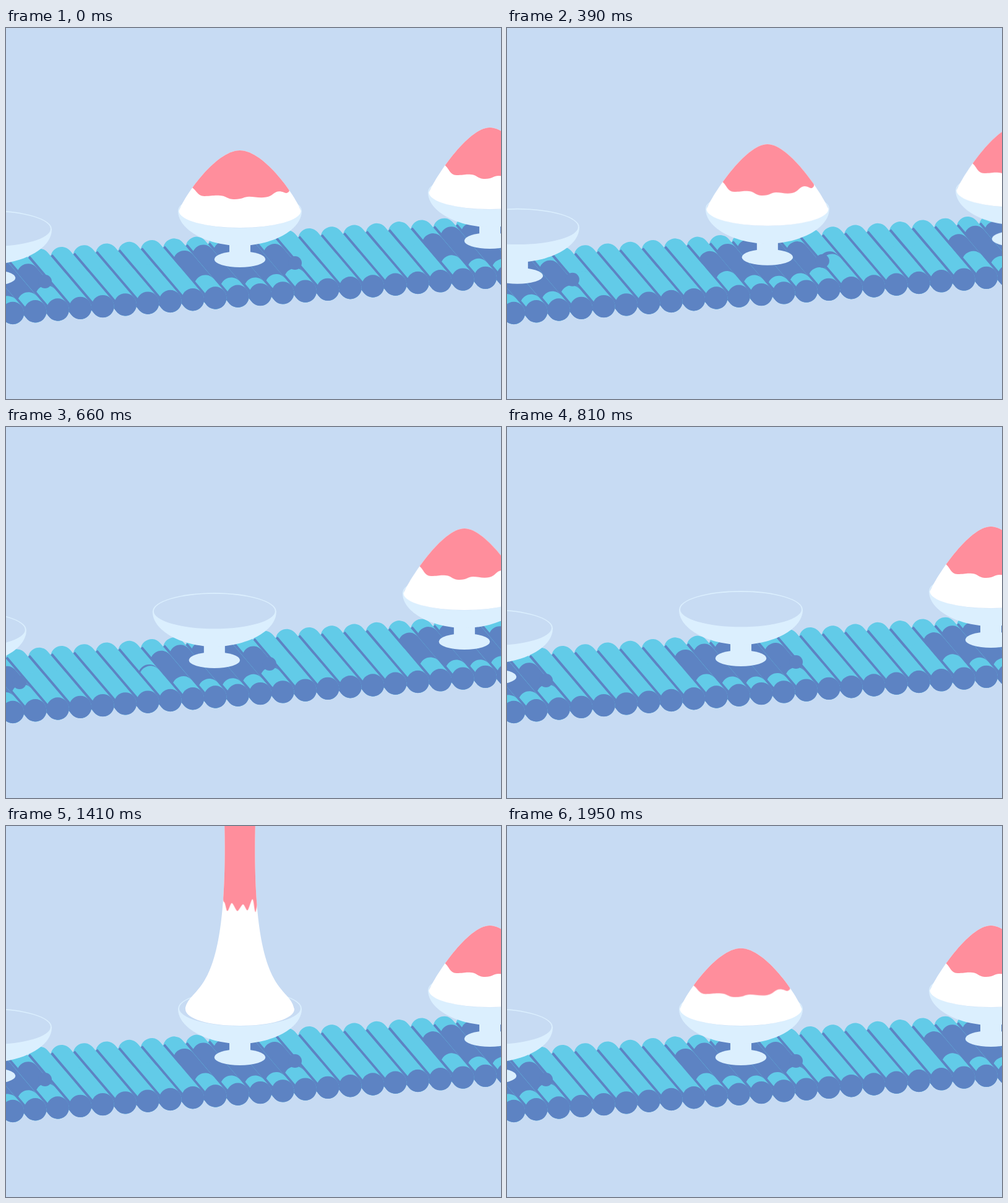
Animation of 800x600 px, one loop 1.98 s. Source, as an HTML page without scripts:

```html
<!DOCTYPE html>
<html lang="en">
<head>
<meta charset="utf-8">
<title>Shaved ice conveyor</title>
<style>
  @property --d { syntax: "<number>"; inherits: true; initial-value: 0; }

  :root {
    --sky: #c7dbf3;
    --cyan: #62cbe8;
    --navy: #5d83c3;
    --glass: #dbeffe;
    --pink: #ff8e9c;
    --time: 1980ms;

    --rest: path("M0 -103C-36 -103 -90 -20 -98.5 2C-98.5 17 -54 29 0 29C54 29 98.5 17 98.5 2C90 -20 36 -103 0 -103Z");
    --squash: path("M0 -96C-40 -96 -92 -19 -98.5 2C-98.5 17 -54 29 0 29C54 29 98.5 17 98.5 2C92 -19 40 -96 0 -96Z");
    --flat: path("M0 -80C-48 -80 -95 -16 -98.5 2C-98.5 17 -54 29 0 29C54 29 98.5 17 98.5 2C95 -16 48 -80 0 -80Z");
    --tall: path("M0 -141C-28 -141 -82 -36 -95 2C-95 17 -52 29 0 29C52 29 95 17 95 2C82 -36 28 -141 0 -141Z");
    --drip: path("M-11 -300C-13 -234 -19 -184 -19 -156C-19 -146 -8 -126 0 -126C8 -126 19 -146 19 -156C19 -184 13 -234 11 -300Z");
    --land: path("M-16 -300C-18 -150 -26 -20 -26 10C-26 22 -14 29 0 29C14 29 26 22 26 10C26 -20 18 -150 16 -300Z");
    --pile: path("M-25 -300C-18 -10 -80 -40 -88 2C-88 18 -50 29 0 29C50 29 88 18 88 2C80 -40 18 -10 25 -300Z");
    --thin: path("M-20 -300C-14 0 -82 -40 -93 2C-93 18 -52 29 0 29C52 29 93 18 93 2C82 -40 14 0 20 -300Z");

    --wave: path("M-150 -700L-74 -43C-66 -38 -65 -26 -54 -26S-40 -28 -30 -27S-20 -20 -8 -20S6 -25 14 -25S30 -22 40 -24S52 -35 60 -35S70 -28 75 -35L150 -700Z");
    --jag: path("M-150 -700L-26 -172C-23 -172 -22 -157 -20 -157S-15 -170 -13 -170S-6 -157 -4 -157S3 -168 5 -168S10 -158 12 -158S18 -176 20 -176S23 -155 25 -155L150 -700Z");
  }

  html, body { margin: 0; width: 100%; height: 100%; overflow: hidden; background: var(--sky); }
  svg { display: block; width: 100%; height: 100%; animation: move var(--time) infinite; }

  /* Rollers: --u is the distance to the nearest bowl, --h half the shadow length */
  .roller {
    --f: calc(11 + 36.37 * var(--i) - var(--d));
    --u: min(max(var(--f) + 397, -397 - var(--f)), max(var(--f) - 7, 7 - var(--f)),
             max(var(--f) - 411, 411 - var(--f)), max(var(--f) - 815, 815 - var(--f)));
    --h: max(-4, min(38.5, 43.75 - .243 * var(--u), 83 - .78 * var(--u)));
    transform: translate(calc((11 + 36.37 * var(--i)) * 1px), calc((461 - 2.72 * var(--i)) * 1px));
  }
  .body, .shade, .front { fill: none; stroke: var(--cyan); stroke-width: 36; stroke-linecap: round; }
  .shade { stroke: var(--navy); stroke-width: 35.6; stroke-dasharray: calc((51.15 + var(--h)) * 1px) 300px; }
  .front { stroke-dasharray: calc((51.15 - var(--h)) * 1px) 300px; }
  .gap { stroke: var(--navy); stroke-width: 10.5; }
  .navy { fill: var(--navy); }

  .belt { transform: translate(calc(var(--d) * 1px), calc(var(--d) * -.0743px)); }
  .glass { fill: var(--glass); }
  .hollow { fill: var(--sky); }
  .ice { d: var(--rest); fill: #fff; }
  .syrup { d: var(--wave); fill: var(--pink); }
  .pour.ice { animation: ice var(--time) linear infinite; }
  .pour.syrup { animation: syrup var(--time) linear infinite; }

  @keyframes move {
    0%, 15.152% { --d: 0; animation-timing-function: cubic-bezier(.3333, 0, .6667, 1); }
    37.878% { --d: 404; animation-timing-function: step-end; }
    37.879%, 100% { --d: 0; }
  }
  @keyframes ice {
    0% { d: var(--squash); transform: none; animation-timing-function: ease-in-out; }
    7.576% { d: var(--rest); transform: none; }
    37.878% { d: var(--rest); transform: none; animation-timing-function: step-end; }
    37.879%, 51.01% { d: var(--drip); transform: translateY(-170px); animation-timing-function: cubic-bezier(.4, .25, .8, .75); }
    57.576% { d: var(--drip); transform: none; }
    61.11% { d: var(--land); transform: none; }
    71.212% { d: var(--pile); transform: none; }
    75.758% { d: var(--thin); transform: none; }
    77.273% { d: var(--tall); transform: none; animation-timing-function: ease-out; }
    83.333% { d: var(--flat); transform: none; animation-timing-function: ease-in-out; }
    90.909% { d: var(--rest); transform: none; animation-timing-function: ease-in-out; }
    100% { d: var(--squash); transform: none; }
  }
  @keyframes syrup {
    0% { d: var(--wave); transform: scale(1.06, .85); animation-timing-function: ease-in-out; }
    7.576% { d: var(--wave); transform: scale(1); }
    37.878% { d: var(--wave); transform: scale(1); animation-timing-function: step-end; }
    37.879%, 67.17% { d: var(--jag); transform: translateY(-150px); }
    71.212% { d: var(--jag); transform: translateY(0); }
    77.273% { d: var(--wave); transform: scale(.85, 1.5); animation-timing-function: ease-out; }
    83.333% { d: var(--wave); transform: scale(1.12, .65); animation-timing-function: ease-in-out; }
    90.909% { d: var(--wave); transform: scale(1); animation-timing-function: ease-in-out; }
    100% { d: var(--wave); transform: scale(1.06, .85); }
  }
</style>
</head>
<body>
<svg viewBox="0 0 800 600" xmlns="http://www.w3.org/2000/svg">
  <defs>
    <g id="roller">
      <path class="body" d="M0 0L-66.5 -78.2"/>
      <path class="shade" d="M0 0L-66.5 -78.2"/>
      <path class="front" d="M0 0L-66.5 -78.2"/>
      <path class="gap" d="M-85.3 -80.6L-9.7 8.3"/>
      <circle class="navy" r="18.2"/>
    </g>
    <g id="bowl">
      <circle class="navy" cx="89" cy="86" r="11"/>
      <g class="glass">
        <ellipse cy="80" rx="41.3" ry="13"/>
        <path d="M-17 50H17V75H-17Z"/>
        <path d="M-100 1.5A100 30.5 0 0 1 100 1.5C100 34 50 58 0 58S-100 34 -100 1.5Z"/>
      </g>
      <ellipse class="hollow" cy="1" rx="98" ry="28.3"/>
    </g>
    <clipPath id="heap"><path class="ice"/></clipPath>
    <clipPath id="stream"><path class="ice pour"/></clipPath>
  </defs>

  <rect class="hollow" width="800" height="600"/>

  <g>
    <use href="#roller" class="roller" style="--i:24"/>
    <use href="#roller" class="roller" style="--i:23"/>
    <use href="#roller" class="roller" style="--i:22"/>
    <use href="#roller" class="roller" style="--i:21"/>
    <use href="#roller" class="roller" style="--i:20"/>
    <use href="#roller" class="roller" style="--i:19"/>
    <use href="#roller" class="roller" style="--i:18"/>
    <use href="#roller" class="roller" style="--i:17"/>
    <use href="#roller" class="roller" style="--i:16"/>
    <use href="#roller" class="roller" style="--i:15"/>
    <use href="#roller" class="roller" style="--i:14"/>
    <use href="#roller" class="roller" style="--i:13"/>
    <use href="#roller" class="roller" style="--i:12"/>
    <use href="#roller" class="roller" style="--i:11"/>
    <use href="#roller" class="roller" style="--i:10"/>
    <use href="#roller" class="roller" style="--i:9"/>
    <use href="#roller" class="roller" style="--i:8"/>
    <use href="#roller" class="roller" style="--i:7"/>
    <use href="#roller" class="roller" style="--i:6"/>
    <use href="#roller" class="roller" style="--i:5"/>
    <use href="#roller" class="roller" style="--i:4"/>
    <use href="#roller" class="roller" style="--i:3"/>
    <use href="#roller" class="roller" style="--i:2"/>
    <use href="#roller" class="roller" style="--i:1"/>
    <use href="#roller" class="roller" style="--i:0"/>
    <use href="#roller" class="roller" style="--i:-1"/>
    <use href="#roller" class="roller" style="--i:-2"/>
  </g>

  <g class="belt">
    <use href="#bowl" x="-430" y="354"/>
    <use href="#bowl" x="-26" y="324"/>
    <g transform="translate(378 294)">
      <use href="#bowl"/>
      <path class="ice pour"/>
      <g clip-path="url(#stream)"><path class="syrup pour"/></g>
    </g>
    <g transform="translate(782 264)">
      <use href="#bowl"/>
      <path class="ice"/>
      <g clip-path="url(#heap)"><path class="syrup"/></g>
    </g>
  </g>
</svg>
</body>
</html>
```
